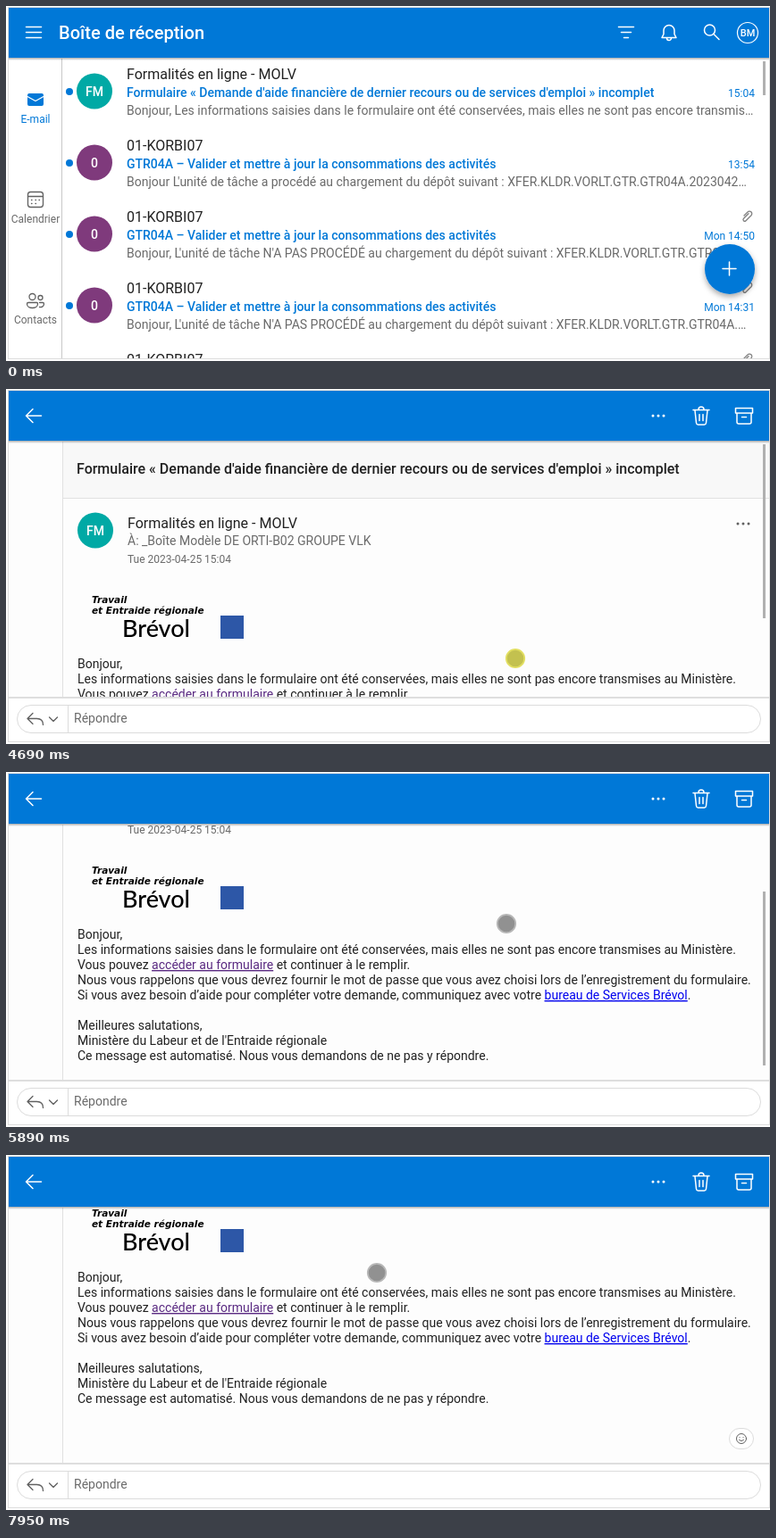
Animation of 855x398 px, one loop 8000 ms. Source, as an HTML page:

```html
<!DOCTYPE html>
<html lang="fr">
<head>
<meta charset="utf-8">
<style>
html, body { margin: 0; width: 100%; height: 100%; overflow: hidden; background: #fff; }
svg { display: block; width: 855px; height: 398px; }
text { font: 14px Roboto, sans-serif; fill: #212121; white-space: pre; }
.title { font-size: 20px; font-weight: 500; fill: #fff; }
.name { font-size: 16px; }
.subject { font-weight: 500; fill: #0078d7; }
.heading { font-size: 16px; font-weight: 500; }
.soft { fill: #6a6a6a; }
.small { font-size: 12px; }
.blue { fill: #0078d7; }
.initials { font-weight: 500; fill: #fff; text-anchor: middle; }
.mid { text-anchor: middle; }
.end { text-anchor: end; }
.icon { fill: none; stroke: #fff; stroke-width: 1.5; stroke-linecap: round; stroke-linejoin: round; }
.grey { stroke: #616161; stroke-width: 1.3; }
.agency { font: italic bold 10.5px "DejaVu Sans", sans-serif; fill: #000; }
.wordmark { font: 500 27px Lato, sans-serif; fill: #000; }
.link { text-decoration: underline; }
</style>
</head>
<body>
<svg viewBox="0 0 855 398">
  <defs>
    <linearGradient id="shade" x2="0" y2="1">
      <stop stop-color="#000" stop-opacity=".32"/><stop offset="1" stop-color="#000" stop-opacity="0"/>
    </linearGradient>
    <filter id="drop" x="-30%" y="-30%" width="160%" height="170%">
      <feDropShadow dx="0" dy="3" stdDeviation="3" flood-opacity=".35"/>
    </filter>
    <clipPath id="window"><rect x="3" y="2" width="851" height="393"/></clipPath>
    <clipPath id="pane"><rect x="3" y="58" width="851" height="288"/></clipPath>
  </defs>
  <rect x="2.5" y="1.5" width="852" height="394" fill="#fff" stroke="#dcdcdc"/>
  <g clip-path="url(#window)">
    <rect x="3" y="2" width="851" height="56" fill="#0078d7"/>
    <g id="inbox"></g>
    <g id="message"></g>
    <rect x="3" y="58" width="851" height="3" fill="url(#shade)"/>
  </g>
  <circle id="cursor" r="10.2" stroke-width="1.8"/>
</svg>
<script>
const LOOP = 8000;
const $ = id => document.getElementById(id);
const text = (x, y, s, cls = '') => `<text x="${x}" y="${y}" class="${cls}">${s}</text>`;
const icon = (d, cls = '') => `<path class="icon ${cls}" d="${d}"/>`;
const disc = (x, y, r, fill) => `<circle cx="${x}" cy="${y}" r="${r}" fill="${fill}"/>`;
const rect = (x, y, w, h, fill, extra = '') =>
  `<rect x="${x}" y="${y}" width="${w}" height="${h}" fill="${fill}" ${extra}/>`;
const dots = (x, y, fill) => [-6, 0, 6].map(d => disc(x + d, y, 1.5, fill)).join('');
const avatar = (x, y, s, fill) => disc(x, y, 20, fill) + text(x, y + 5, s, 'initials');

const sender = 'Formalités en ligne - MOLV';
const subject = "Formulaire « Demande d'aide financière de dernier recours ou de services d'emploi » incomplet";
const teal = '#00a9a5';

function mailRow(i, from, title, preview, time) {
  const first = i === 0;
  return `<g transform="translate(0 ${i * 80})">` +
    disc(71, 96, 4, '#0078d7') + avatar(99, 95.5, first ? 'FM' : '0', first ? teal : '#7f3a7c') +
    text(135, 82, from, 'name') + text(135, 102, title, 'subject') +
    text(135, 122, preview, 'soft') + text(838, 102, time, 'small blue end') +
    (first ? '' : icon('M826 155l4-4a2.6 2.6 0 0 1 4 3.700l-6 6a1.700 1.700 0 0 1-2.500-2.500l5.500-5.500', 'grey" stroke-opacity=".8')) +
    '</g>';
}

const batch = 'GTR04A – Valider et mettre à jour la consommations des activités';
const refused = "Bonjour, L'unité de tâche N'A PAS PROCÉDÉ au chargement du dépôt suivant : XFER.KLDR.VORLT.GTR.GTR04A.…";
const rows = [
  [sender, subject, 'Bonjour, Les informations saisies dans le formulaire ont été conservées, mais elles ne sont pas encore transmis…', '15:04'],
  ['01-KORBI07', batch, "Bonjour L'unité de tâche a procédé au chargement du dépôt suivant : XFER.KLDR.VORLT.GTR.GTR04A.2023042…", '13:54'],
  ['01-KORBI07', batch, refused, 'Mon 14:50'],
  ['01-KORBI07', batch, refused, 'Mon 14:31'],
  ['01-KORBI07', '', '', '']
];

$('inbox').innerHTML =
  icon('M22.500 23.500h17M22.500 29.500h17M22.500 35.500h17M685.500 23.500h17M688.500 29.500h11M691.500 35.500h5') +
  icon('M734 35.500l2-4v-4a6 6 0 0 1 12 0v4l2 4zM739.500 36a2.500 2.500 0 0 0 5 0') +
  icon('M792 31.500l6 6') + '<circle class="icon" cx="787.500" cy="27" r="6"/>' +
  '<circle class="icon" cx="830" cy="30" r="11.500" style="stroke-width:1.2"/>' +
  text(830, 34, 'BM', 'initials" style="font-size:11px') + text(59, 37, 'Boîte de réception', 'title') +
  rect(24, 98, 18, 14, '#0078d7', 'rx="2"') + icon('M24 101.500l9 5 9-5', '" style="stroke-width:1.2') +
  text(33, 131, 'E-mail', 'small blue mid') +
  '<rect class="icon grey" x="24.500" y="208.500" width="17" height="17" rx="3"/>' +
  icon('M24.500 213.500h17M28.500 217.500h.5M33 217.500h.5M37 217.500h.5M28.500 221.500h.5M33 221.500h.5', 'grey') +
  text(33, 243, 'Calendrier', 'small soft mid') +
  '<circle class="icon grey" cx="29.500" cy="326" r="3.500"/><circle class="icon grey" cx="38.500" cy="327" r="2.500"/>' +
  icon('M25 332.500h9.500q1 0 1 1.500c0 6-12 6-12 0q0-1.500 1.500-1.500M37.500 332.500h3.500q1.500 0 1.500 1.500c0 3-3 4-5 3.500', 'grey') +
  text(33, 356, 'Contacts', 'small soft mid') +
  rect(62, 59, 1, 337, '#c8c8c8') +
  rows.map((row, i) => mailRow(i, ...row)).join('') +
  rect(847, 62, 3, 38, '#b0b0b0') +
  '<circle cx="810" cy="295" r="28" fill="#0078d7" filter="url(#drop)"/>' +
  icon('M802 294.500h15M809.500 287v15');

const link = (s, fill) => `<tspan class="link" fill="${fill}" style="fill:${fill}">${s}</tspan>`;
const body = [
  'Bonjour,',
  'Les informations saisies dans le formulaire ont été conservées, mais elles ne sont pas encore transmises au Ministère.',
  `Vous pouvez ${link('accéder au formulaire', '#5a2a82')} et continuer à le remplir.`,
  'Nous vous rappelons que vous devrez fournir le mot de passe que vous avez choisi lors de l’enregistrement du formulaire.',
  `Si vous avez besoin d’aide pour compléter votre demande, communiquez avec votre ${link('bureau de Services Brévol', '#0000ee')}.`,
  '',
  'Meilleures salutations,',
  "Ministère du Labeur et de l'Entraide régionale",
  'Ce message est automatisé. Nous vous demandons de ne pas y répondre.'
];

$('message').innerHTML =
  rect(3, 2, 851, 56, '#0078d7') +
  icon('M39.500 30h-17M30 22.500l-7.500 7.500 7.500 7.500') + dots(730, 30, '#fff') +
  icon('M769 23.500h18M775 23a3 3 0 0 1 6 0M771 24l1.500 14q.3 2 2 2h7q1.700 0 2-2l1.500-14M776 28.500v7M780 28.500v7') +
  icon('M816.500 21.500h19v5.500h-19zM818 27v10q0 2 2 2h12q2 0 2-2v-10M823.500 31.500h5') +
  '<g clip-path="url(#pane)">' + rect(3, 58, 851, 288, '#fdfdfd') +
  '<g id="scroll">' + rect(63, 58, 791, 64, '#f8f8f8') + rect(63, 122, 791, 1, '#e1e1e1') +
  text(79, 95, subject, 'heading') + avatar(100, 158.5, 'FM', teal) +
  text(136, 156, sender, 'name') + text(136, 175, 'À: _Boîte Modèle DE ORTI-B02 GROUPE VLK', 'soft') +
  text(136, 195, 'Tue 2023-04-25 15:04', 'small soft') + dots(825, 151, '#616161') +
  '<g id="body">' + text(96, 240, 'Travail', 'agency') + text(96, 252, 'et Entraide régionale', 'agency') +
  text(130, 278, 'Brévol', 'wordmark') + rect(240, 254, 26, 26, '#2d57a7') +
  body.map((s, i) => text(80, 313 + 17 * i, s)).join('') +
  '<rect x="809.500" y="477.500" width="27" height="23" rx="11.500" fill="#fff" stroke="#dcdcdc"/>' +
  '<circle class="icon grey" cx="823" cy="489" r="5.500" style="stroke-width:1"/>' +
  icon('M821 487.500h.1M825 487.500h.1M820.500 490.500q2.500 2.500 5 0', 'grey" style="stroke-width:1') +
  '</g></g>' + rect(63, 59, 1, 287, '#e1e1e1') +
  rect(847, 62, 3, 195, '#b0b0b0', 'id="thumb"') + '</g>' +
  rect(3, 346, 851, 50, '#fff') + rect(3, 345, 851, 2, '#dedede') +
  '<rect x="12.500" y="354.500" width="832" height="31" rx="15.500" fill="#fff" stroke="#dcdcdc"/>' +
  rect(69, 355, 1, 31, '#dcdcdc') +
  icon('M30 363.500l-6 6 6 6M24.500 369.500h10q7 0 7 7', 'grey') + icon('M48.500 368l4.500 4.500 4.500-4.500', 'grey') +
  text(76, 374, 'Répondre', 'soft');

// Keyframes: time followed by values, linear in between.
const cursorPath = [
  [960, 391, 377], [1170, 401, 298], [1380, 398, 171], [1850, 428, 94], [3800, 428, 94],
  [4300, 586, 308], [4470, 570, 302], [4690, 570, 302], [5350, 564, 227], [5890, 560, 170],
  [6330, 557, 138], [6490, 557, 131], [6600, 557, 131], [6730, 557, 127], [7470, 557, 127],
  [7740, 480, 118], [7950, 415, 132]
];
const scrollPath = [[4690, 0], [5350, 70], [5890, 126], [6330, 160], [6490, 167], [6600, 167], [6730, 171]];
const fadeIn = [[2650, 0], [3060, 1]];
const thumbFade = [[7000, 1], [7290, 0]];

function at(path, t) {
  const next = path.findIndex(p => p[0] > t);
  if (next < 1) return path.at(next).slice(1);
  const [a, b] = [path[next - 1], path[next]];
  const k = (t - a[0]) / (b[0] - a[0]);
  return a.slice(1).map((v, i) => v + (b[i + 1] - v) * k);
}
const within = (t, from, to) => t >= from && t < to;

function draw(now) {
  const t = now % LOOP;
  const [x, y] = at(cursorPath, t);
  const scroll = Math.round(at(scrollPath, t)[0]);
  const pressed = within(t, 2710, 2790) || within(t, 4690, 4760);
  const cursor = $('cursor');
  cursor.setAttribute('transform', `translate(${Math.round(x)} ${Math.round(y)})`);
  cursor.setAttribute('visibility', within(t, 960, 1220) || t >= 1380 ? 'visible' : 'hidden');
  cursor.setAttribute('fill', pressed ? 'rgba(184,182,48,.85)' : 'rgba(118,118,118,.8)');
  cursor.setAttribute('stroke', pressed ? '#e2df62' : '#b8b8b8');
  $('message').setAttribute('opacity', t < 2710 ? 0 : at(fadeIn, t)[0]);
  $('body').setAttribute('visibility', t < 3220 ? 'hidden' : 'inherit');
  $('scroll').setAttribute('transform', `translate(0 ${-scroll})`);
  $('thumb').setAttribute('y', 62 + Math.round(scroll * .575));
  $('thumb').setAttribute('opacity', at(thumbFade, t)[0]);
  requestAnimationFrame(() => draw(performance.now()));
}
draw(performance.now());
</script>
</body>
</html>
```
